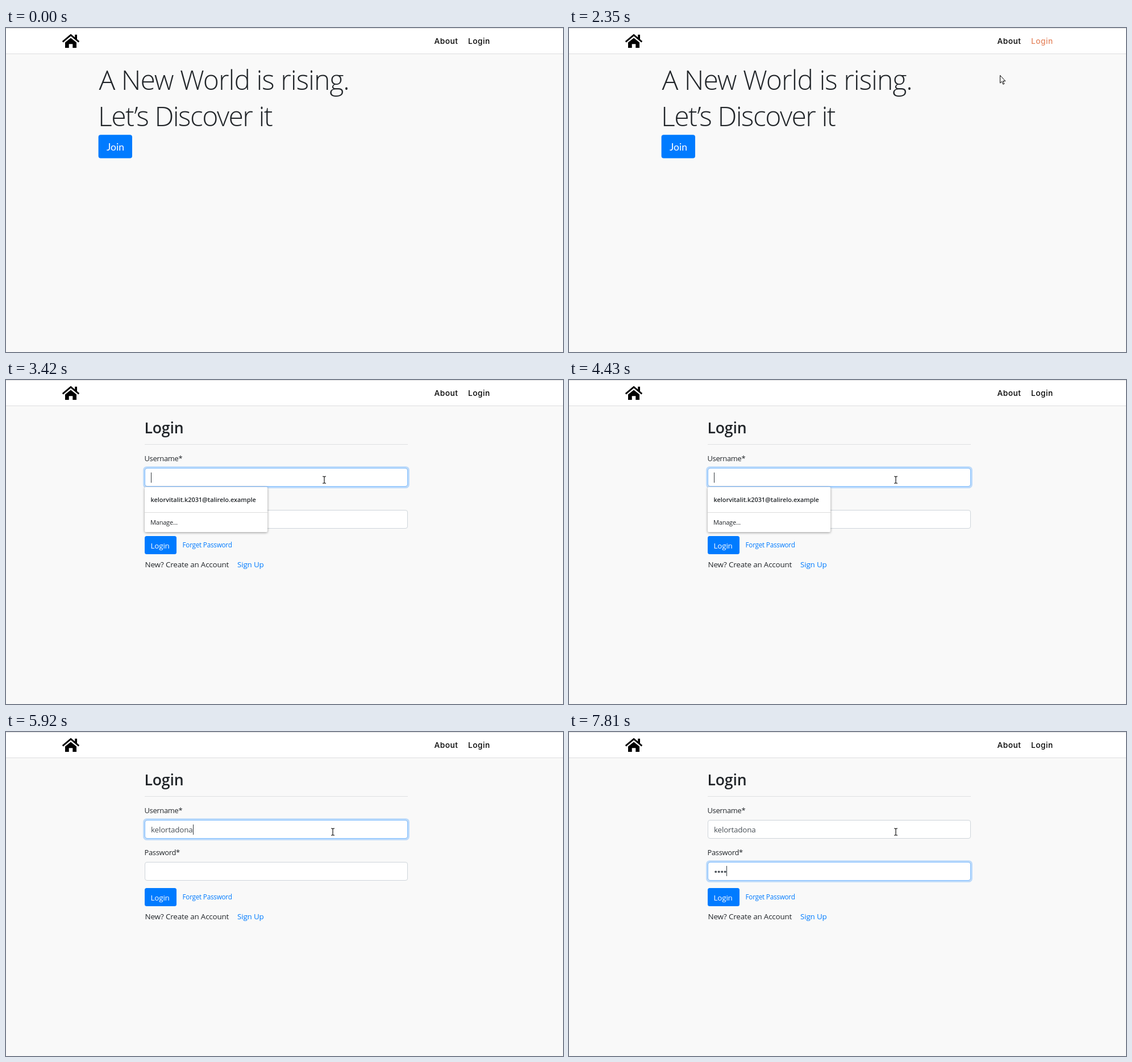
Recreate the animation shown at these times as an HTML page. Size 980 by 571 pixels, loop 8000 ms.

```html
<!DOCTYPE html>
<html lang="en">
<head>
<meta charset="utf-8">
<title>Login</title>
<style>
html, body { margin: 0; width: 100%; height: 100%; overflow: hidden; background: #f9f9f9; }
svg { display: block; width: 980px; height: 571px; }
text { font: 13.4px "Open Sans", "Noto Sans", sans-serif; letter-spacing: -.16px; fill: #212529; }
.nav { font: 500 13.7px Inter, sans-serif; letter-spacing: .5px; fill: #000; }
.nav.hot { fill: #e58660; }
.display { font-size: 48px; font-weight: 300; letter-spacing: -1px; }
.tight { letter-spacing: -1.5px; }
.join { font: 17.5px Lato, sans-serif; letter-spacing: 0; }
.title { font-size: 26.6px; font-weight: 600; }
.label { font-size: 12.9px; letter-spacing: -.3px; }
.small { font-size: 11.7px; letter-spacing: -.22px; }
.mail { font-size: 10.9px; font-weight: 600; letter-spacing: 0; }
.manage { font-size: 11px; letter-spacing: -.2px; }
.link { fill: #007bff; }
.white { fill: #fff; }
.typed { fill: #495057; }
.button { fill: #007bff; }
.field { fill: #fff; stroke: #ced4da; }
.ring { fill: none; stroke: #007bff; stroke-opacity: .25; stroke-width: 2.9; }
.edge { fill: none; stroke: #80bdff; }
#menu > rect { fill: #fff; filter: drop-shadow(0 1px 2px rgba(0, 0, 0, .4)); }
.cursor { fill: #fff; stroke: #000; stroke-linejoin: round; }
</style>
</head>
<body>
<svg viewBox="0 0 980 571">
  <rect width="980" height="571" fill="#f9f9f9"/>
  <rect width="980" height="45" fill="#fff"/>
  <path d="M0 .5H980M0 45.5H980" stroke="#dcdddf"/>
  <path d="M121.2 11.8H125V21.5L121.2 18ZM104 25.6L114 17.4L124 25.6V35H117.3V28.3H110.7V35H104Z"/>
  <path d="M99.7 24.3L114 12.4L128.3 24.3" fill="none" stroke="#000" stroke-width="2.8"/>
  <text class="nav" x="753.5" y="27.5">About</text>
  <text class="nav" id="login" x="813" y="27.5">Login</text>

  <g id="home">
    <text class="display" x="163.5" y="109">A New World is rising.</text>
    <text class="display tight" x="162" y="173">Let’s Discover it</text>
    <rect class="button" x="162.6" y="188.2" width="59.4" height="41.3" rx="4"/>
    <text class="join white" x="192.5" y="216" text-anchor="middle">Join</text>
  </g>

  <g id="form">
    <text class="title" x="243.5" y="94">Login</text>
    <path d="M244 113.5H707" stroke="#dfe0e1"/>
    <text class="label" x="243.5" y="143">Username*</text>
    <text class="label" x="243.5" y="216.5">Password*</text>
    <rect class="field" x="244.5" y="155.5" width="462" height="32" rx="3.5"/>
    <rect class="field" x="244.5" y="229.5" width="462" height="32" rx="3.5"/>
    <g id="focusUser">
      <rect class="ring" x="242.6" y="153.6" width="465.8" height="35.8" rx="5"/>
      <rect class="edge" x="244.5" y="155.5" width="462" height="32" rx="3.5"/>
    </g>
    <g id="focusPass">
      <rect class="ring" x="242.6" y="227.6" width="465.8" height="35.8" rx="5"/>
      <rect class="edge" x="244.5" y="229.5" width="462" height="32" rx="3.5"/>
    </g>
    <text class="typed" id="user" x="255" y="177"></text>
    <g class="typed" id="dots">
      <circle cx="258.2" cy="246.3" r="1.9"/>
      <circle cx="263.7" cy="246.3" r="1.9"/>
      <circle cx="269.2" cy="246.3" r="1.9"/>
      <circle cx="274.7" cy="246.3" r="1.9"/>
    </g>
    <rect id="caret" width="1" height="18" fill="#343a40"/>
    <rect class="button" x="244" y="275" width="56" height="32" rx="3.5"/>
    <text class="white" x="254.5" y="296.5">Login</text>
    <text class="small link" x="310.5" y="294.5">Forget Password</text>
    <text x="244.5" y="329.5">New? Create an Account</text>
    <text class="link" x="407" y="329.5">Sign Up</text>
    <g id="menu">
      <rect x="244" y="188.5" width="216" height="79.5" rx="2"/>
      <path d="M244 233.5H460" stroke="#dcdcdc"/>
      <text class="mail" x="254.5" y="215">kelorvitalit.k2031@talirelo.example</text>
      <text class="manage" x="254" y="255">Manage...</text>
    </g>
  </g>

  <g id="pointer">
    <path class="cursor" id="arrow" d="M.5 .5V14L3.5 11.2L5.8 16.2L7.8 15.3L5.6 10.5H9.8Z"/>
    <path class="cursor" id="hand" d="M-1.6 11V1.4a1.6 1.4 0 0 1 3.2 0V7Q3 5.8 4.3 7.2Q6 6 7 8Q8.4 7.4 8.4 9.2V13Q8 16 6.5 18.5H-.5Q-2 16-5.3 12.4Q-5 9.6-1.6 11.5ZM1.6 7v4M4.4 7.4v3.6M7 8.2v2.8"/>
    <path id="beam" d="M-3-6H-1L0-5.3L1-6H3M0-5.3V5.3M-3 6H-1L0 5.3L1 6H3" fill="none" stroke="#000" stroke-width="1.1"/>
  </g>
</svg>
<script>
const LOOP = 8000, TICK = 77, FORM_AT = 2560;
const NAME = "kelortadona";
const nameKeys = [4820, 4897, 4973, 5050, 5370, 5520, 5600, 5680, 5840, 5840, 5920];
const passKeys = [7410, 7490, 7730, 7810];
const caretOn = [[2860, 3870], [4370, 6720], [7180, LOOP]];

// Pointer path: time, x, y
const path = [
  [320, 905, 463], [550, 884, 250], [780, 848, 70], [935, 822, 8], [1090, 823, 15],
  [1160, 825, 26], [1883, 825, 26], [2345, 758, 83], [2720, 625, 168], [2790, 569, 183],
  [2860, 564, 179], [2940, 560, 176], [4043, 560, 176], [4430, 575, 176]
];

const el = id => document.getElementById(id);
const show = (id, on) => { el(id).style.display = on ? "" : "none"; };
const within = (t, a, b) => t >= a && t < b;
const pressed = (keys, t) => keys.filter(k => k <= t).length;

// Linear between path points, advancing in discrete ticks
function pointerAt(t) {
  let i = 0;
  while (i < path.length - 1 && path[i + 1][0] <= t) i++;
  const a = path[i], b = path[i + 1] || a;
  const gap = b[0] - a[0];
  const u = gap ? Math.floor((t - a[0]) / TICK) * TICK / gap : 0;
  return [1, 2].map(k => Math.round(a[k] + (b[k] - a[k]) * u));
}

function drawPointer(t, onForm) {
  const [x, y] = pointerAt(t);
  const hand = !onForm && within(x, 808, 858) && within(y, 5, 38);
  const beam = onForm && within(x, 244, 707) && within(y, 155, 188);
  show("pointer", t >= path[0][0]);
  show("hand", hand);
  show("beam", beam);
  show("arrow", !hand && !beam);
  el("pointer").setAttribute("transform", `translate(${x} ${y})`);
  el("login").classList.toggle("hot", !onForm && within(t, 935, FORM_AT));
}

function drawForm(t) {
  const shift = t < 6150 ? 0 : t < 6270 ? .5 : 1;
  el("focusUser").style.opacity = 1 - shift;
  el("focusPass").style.opacity = shift;
  show("menu", within(t, 3250, 5600));

  const user = el("user"), dots = pressed(passKeys, t);
  user.textContent = NAME.slice(0, pressed(nameKeys, t));
  [...el("dots").children].forEach((dot, i) => { dot.style.display = i < dots ? "" : "none"; });

  const inPass = shift > 0;
  const width = inPass ? dots * 5.5 : user.textContent ? user.getComputedTextLength() : 0;
  el("caret").setAttribute("x", Math.round(255 + width));
  el("caret").setAttribute("y", inPass ? 236 : 163);
  show("caret", caretOn.some(([a, b]) => within(t, a, b)));
}

function render(t) {
  const onForm = t >= FORM_AT;
  show("home", !onForm);
  show("form", onForm);
  if (onForm) drawForm(t);
  drawPointer(t, onForm);
}

const start = performance.now();
function frame() {
  render((performance.now() - start) % LOOP);
  requestAnimationFrame(frame);
}
frame();
</script>
</body>
</html>
```
